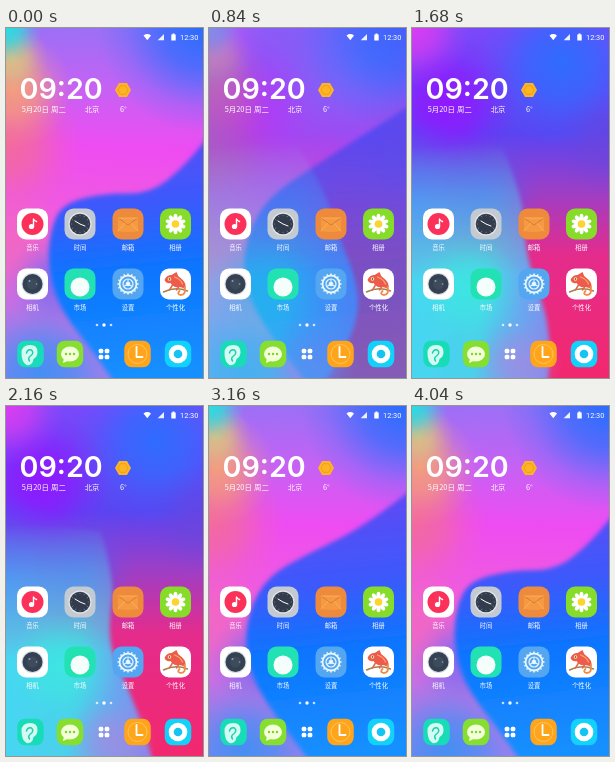
Write an HTML page that moves like this. It is 197x350 px and loops after 4.08 s.

```html
<!DOCTYPE html>
<html lang="zh">
<head>
<meta charset="utf-8">
<style>
  html, body { margin: 0; width: 100%; height: 100%; overflow: hidden; background: #4a68f0; }
  svg { display: block; width: 100vw; height: 100vh; }
  text { fill: #fff; font-family: "Noto Sans CJK SC", "Noto Sans CJK", sans-serif; }
  .clock { font: 600 28.7px Inter, sans-serif; }
  .date { font-size: 7.4px; font-weight: 500; }
  .status { font: 7.4px Roboto, sans-serif; }
  .label { font-size: 6.3px; text-anchor: middle; }
</style>
</head>
<body>
<svg viewBox="0 0 197 350" preserveAspectRatio="none">
  <defs>
    <linearGradient id="dawnSky" gradientUnits="userSpaceOnUse" x1="100" y1="0" x2="85" y2="350">
      <stop stop-color="#9a70f5"/><stop offset=".17" stop-color="#c562f4"/>
      <stop offset=".34" stop-color="#ee4cf2"/><stop offset=".6" stop-color="#f060d8"/>
      <stop offset="1" stop-color="#9a80ee"/>
    </linearGradient>
    <linearGradient id="waveFill" gradientUnits="userSpaceOnUse" x1="90" y1="110" x2="115" y2="350">
      <stop stop-color="#5a4cf5"/><stop offset=".3" stop-color="#3b5afc"/>
      <stop offset=".55" stop-color="#0f74ff"/><stop offset="1" stop-color="#1590ff"/>
    </linearGradient>
    <linearGradient id="duskSky" x2="0" y2="1">
      <stop stop-color="#7a48fa"/><stop offset=".3" stop-color="#5a44f2"/>
      <stop offset=".46" stop-color="#9a3fc8"/><stop offset=".65" stop-color="#e42c8c"/>
      <stop offset="1" stop-color="#f2286e"/>
    </linearGradient>
    <linearGradient id="ridgeFill" gradientUnits="userSpaceOnUse" x1="10" y1="270" x2="145" y2="290">
      <stop stop-color="#46d6f2"/><stop offset=".45" stop-color="#4cd0ea"/>
      <stop offset=".75" stop-color="#6aa6f0"/><stop offset="1" stop-color="#8a86ea"/>
    </linearGradient>
    <linearGradient id="rise" gradientUnits="userSpaceOnUse" x1="50" y1="115" x2="60" y2="250">
      <stop stop-color="#000"/><stop offset=".4" stop-color="#777"/><stop offset="1" stop-color="#fff"/>
    </linearGradient>
    <mask id="riseMask" maskUnits="userSpaceOnUse" x="-40" y="0" width="280" height="400">
      <rect x="-40" width="280" height="400" fill="url(#rise)"/>
    </mask>
    <filter id="soft" filterUnits="userSpaceOnUse" x="-60" y="0" width="320" height="420"><feGaussianBlur stdDeviation="2.200"/></filter>
  </defs>

  <g id="dawn">
    <rect width="197" height="350" fill="url(#dawnSky)"/>
    <g id="dawnGlows"></g>
    <path id="wave" fill="url(#waveFill)" filter="url(#soft)"/>
  </g>
  <g id="dusk">
    <rect width="197" height="350" fill="url(#duskSky)"/>
    <g id="duskGlows"></g>
    <g mask="url(#riseMask)"><path id="ridge" fill="url(#ridgeFill)" filter="url(#soft)"/></g>
    <g id="ridgeGlows"></g>
  </g>

  <g fill="#fff">
    <path d="M137.500 7.400Q141.300 4.700 145 7.400L141.300 12.300Z"/>
    <path d="M158 6V12.300H151.700Z" opacity=".9"/>
    <path d="M165.300 6.500h1.200v-.9h2v.9h1.200v6h-4.400Z"/>
  </g>
  <text class="status" x="174" y="12.400">12:30</text>
  <text class="clock" x="13.500" y="71.300">09:20</text>
  <path d="M109 62l4-7h8l4 7-4 7h-8Z" fill="#ffb422"/>
  <path d="M112 62l2.500-4.300h5l2.500 4.300-2.500 4.300h-5Z" fill="none" stroke="#e89a25" stroke-width=".8"/>
  <g class="date">
    <text x="15.700" y="84">5月20日</text><text x="45" y="84">周二</text>
    <text x="78.700" y="84">北京</text><text x="114" y="84">6°</text>
  </g>

  <g id="icons"></g>
  <g fill="#fff"><circle cx="91" cy="297" r="1.300" opacity=".75"/><circle cx="98" cy="297" r="1.700"/><circle cx="105" cy="297" r="1.300" opacity=".75"/></g>
</svg>
<script>
const LOOP = 4080, STEP = 40;
const $ = selector => document.querySelector(selector);

// Outlines are smoothed through these points; each wallpaper flows from one to the other.
const wave = {
  from: [[120, 372], [94, 332], [54, 282], [42, 240], [44, 202], [57, 175], [100, 165], [144, 166], [179, 138], [215, 92]],
  to: [[110, 372], [78, 332], [44, 282], [33, 245], [38, 205], [60, 168], [100, 139], [137, 112], [170, 92], [215, 66]]
};
const ridge = {
  from: [[85, 110], [114, 164], [122, 205], [136, 245], [145, 280], [140, 315], [118, 365]],
  to: [[95, 125], [109, 176], [103, 212], [105, 247], [124, 286], [137, 322], [150, 365]]
};

// Tracks: [time, value]
const waveFlow = [[0, 0], [520, .8], [1160, 1], [2760, 1], [3600, .35], [LOOP, 0]];
const ridgeFlow = [[520, -.6], [3080, 1.9]];
const duskOpacity = [[520, 0], [1160, 1], [2440, 1], [3080, 0]];

// Glows: [x, y, radius, colour, opacity]
const glows = {
  dawn: [
    [197, 0, 105, '#2c6cff', 1],
    [0, 115, 75, '#f36c98', .95],
    [8, 62, 58, '#f5a078', .95],
    [6, 30, 36, '#d8c880', .9],
    [0, 0, 36, '#22e2e0', 1],
    [0, 215, 60, '#f268c0', .8],
    [48, 255, 48, '#6a6cf2', .75],
    [35, 345, 75, '#3c90f4', .9]
  ],
  dusk: [
    [150, 35, 85, '#2f6cff', 1],
    [35, 75, 70, '#9018ff', 1],
    [0, 0, 60, '#dc3cf2', 1],
    [0, 175, 85, '#5068f8', .9],
    [70, 165, 60, '#5a58f0', .85],
    [197, 115, 55, '#6a46d8', .6]
  ],
  ridge: [
    [55, 262, 55, '#3ce8e0', .85],
    [105, 335, 45, '#a58ae0', .75]
  ]
};

function valueAt(track, time) {
  if (time <= track[0][0]) return track[0][1];
  const next = track.findIndex(([at]) => at >= time);
  if (next < 0) return track.at(-1)[1];
  const [t0, a] = track[next - 1], [t1, b] = track[next];
  return a + (b - a) * (time - t0) / (t1 - t0);
}

const blend = ({ from, to }, u) => from.map((point, i) => point.map((v, k) => v + (to[i][k] - v) * u));

// Quadratic curves joined at the midpoints of the control polygon.
function smooth(points) {
  return points.slice(0, -1).map(([x, y], i) => {
    const [nx, ny] = points[i + 1];
    return i ? `Q${x} ${y} ${(x + nx) / 2} ${(y + ny) / 2}` : `${x} ${y}`;
  }).join('') + `L${points.at(-1)}`;
}

function set(node, attributes) {
  for (const key in attributes) node.setAttribute(key, attributes[key]);
  return node;
}

const make = (tag, parent, attributes) =>
  parent.appendChild(set(document.createElementNS('http://www.w3.org/2000/svg', tag), attributes));

for (const name in glows) {
  glows[name].forEach(([cx, cy, r, colour, opacity], i) => {
    const id = name + i;
    const fill = make('radialGradient', $('defs'), { id });
    for (const [offset, alpha] of [[0, 1], [.4, .7], [.75, .2], [1, 0]])
      make('stop', fill, { offset, 'stop-color': colour, 'stop-opacity': alpha });
    make('circle', $(`#${name}Glows`), { cx, cy, r, opacity, fill: `url(#${id})` });
  });
}

function render(time) {
  set($('#wave'), { d: `M${smooth(blend(wave, valueAt(waveFlow, time)))}L230 372Z` });
  set($('#ridge'), { d: `M-30 110L${smooth(blend(ridge, valueAt(ridgeFlow, time)))}L-30 372Z` });
  set($('#dusk'), { opacity: valueAt(duskOpacity, time) });
}

// Icons are drawn around their own centre.
const disc = (r, fill, x = 0, y = 0) => `<circle cx="${x}" cy="${y}" r="${r}" fill="${fill}"/>`;
const shape = (d, fill) => `<path d="${d}" fill="${fill}"/>`;
const line = (d, colour, width = 1) =>
  `<path d="${d}" fill="none" stroke="${colour}" stroke-width="${width}" stroke-linecap="round" stroke-linejoin="round"/>`;
const ring = (r, colour, width) => `<circle r="${r}" fill="none" stroke="${colour}" stroke-width="${width}"/>`;
const spin = (count, mark) => Array.from({ length: count }, (_, i) =>
  `<g transform="rotate(${i * 360 / count})">${mark}</g>`).join('');

const art = {
  music: disc(11, '#fb3159') + disc(2.6, '#fff', -1, 2.5) + line('M1 2.500V-5Q2-3 4-2.500', '#fff', 1.4),
  clock: disc(11.500, '#e3e6ea') + disc(10.300, '#323c4c') +
    spin(12, line('M0-8.800V-8.200', '#8e969c', .6)) + line('M-5-3L0 0L5 2', '#fff', 1),
  mail: shape('M-10-6H10V7Q0 9-10 7Z', '#f59a42') + line('M-10-6L0 1L10-6', '#d97a30', 1) +
    line('M-10-6H10M-10 7L-3-1M10 7L3-1', '#ffb868', .7),
  album: spin(10, '<ellipse cy="-6" rx="2.100" ry="4.300" fill="#fff"/>') + disc(3.800, '#ffd32d'),
  camera: disc(11, '#d5dbe1') + disc(10, '#344152') + disc(5.500, '#3d4b5d') + disc(1, '#8fa0b2', -3, -3) + disc(.8, '#8fa0b2', 4, 0),
  market: disc(9.500, '#f4fffc', 0, 3),
  settings: spin(16, line('M0-10V-9.500', '#e7f6ff', 1.500)) + ring(8.500, '#e7f6ff', 1.800) +
    ring(5, '#e7f6ff', 1.200) + spin(3, line('M0-2V-4.500', '#e7f6ff', 1)) + disc(2.300, '#e7f6ff'),
  theme: line('M-12 8Q0 2 12 7', '#a8804c', 1.500) +
    shape('M-11-4Q-9-9-4-9L1-12Q2-8 5-6Q11-2 10 5Q6 3 3 3Q-2 4-5-1Q-9 0-11-4Z', '#ee5a4c') +
    line('M9 3Q11 11 5 11Q1 10 4 7', '#f18b49', 1.800) +
    line('M-3 1L-6 6M3 3L1 6', '#e0694c', 1.500) + line('M-1-7Q5-5 7 0', '#f8a868', 1.300) +
    disc(1.800, '#ffe7a0', -6, -5) + disc(.8, '#333', -6, -5),
  phone: shape('M-9-1Q-9-9 0-9Q7-9 7-2Q7 3 3 5Q2 12-4 11Q-9 8-9-1Z', '#d4fbf2') +
    line('M-4-1Q-3-5 1-4Q4-1 0 2Q-3 4-1 7', '#20ceb0', 1.500),
  message: '<ellipse rx="9" ry="7.500" fill="#f2ffd8"/>' + shape('M-6 4L-7 9L0 6Z', '#f2ffd8') +
    [-4, 0, 4].map(x => disc(1.200, '#7fcf30', x)).join(''),
  contacts: ring(9.500, '#ffc457', 1) + line('M-1-7V3H5', '#fff', 1.800),
  browser: disc(9.300, '#fff') + disc(4.300, '#16c4f2'),
  drawer: [-3, 3].map(x => [-3, 3].map(y =>
    `<rect x="${x - 2.300}" y="${y - 2.300}" width="4.600" height="4.600" rx="1.500" fill="#fff"/>`).join('')).join('')
};

function addIcon(x, y, name, fill, label, size = 31) {
  const tile = fill ? `<rect x="${-size / 2}" y="${-size / 2}" width="${size}" height="${size}" rx="${size * .29}" fill="${fill}"/>` : '';
  const caption = label ? `<text class="label" y="25.500">${label}</text>` : '';
  make('g', $('#icons'), { transform: `translate(${x} ${y})` }).innerHTML = tile + art[name] + caption;
}

const rows = [
  [['music', '#fff', '音乐'], ['clock', '#c4cad2', '时间'], ['mail', '#ee8a3c', '邮箱'], ['album', '#86dc28', '相册']],
  [['camera', '#fff', '相机'], ['market', '#22e2b4', '市场'], ['settings', '#55a6f0', '设置'], ['theme', '#fff', '个性化']]
];
rows.forEach((row, r) => row.forEach((icon, c) => addIcon([26.500, 74, 122, 169.500][c], 196 + r * 60, ...icon)));
[[24.500, 'phone', '#18dcb8'], [64, 'message', '#86de30'], [98, 'drawer', ''], [131.500, 'contacts', '#ffa51c'], [172, 'browser', '#12d2fa']]
  .forEach(([x, name, fill]) => addIcon(x, 326, name, fill, '', 26.500));

let start;
function tick(now) {
  start ??= now;
  render(Math.floor((now - start) % LOOP / STEP) * STEP);
  requestAnimationFrame(tick);
}
render(0);
requestAnimationFrame(tick);
</script>
</body>
</html>
```
